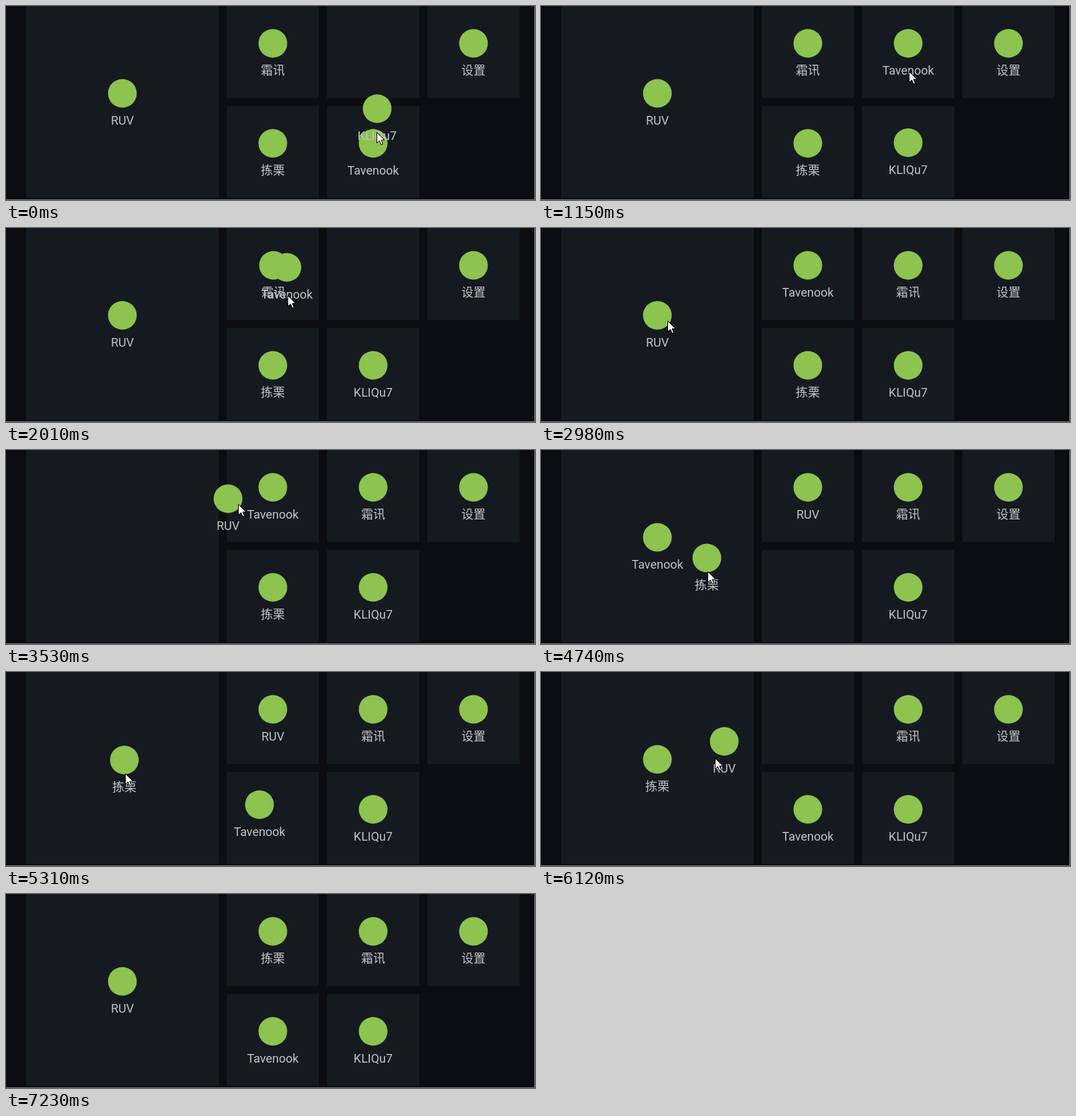
Animation of 791 by 291 pixels, one loop 7.79 s. Source, as an HTML page with a canvas:

```html
<!DOCTYPE html>
<html lang="zh-CN">
<head>
<meta charset="utf-8">
<title>Tile launcher</title>
<style>
html, body { margin: 0; width: 100%; height: 100%; overflow: hidden; background: #0c0d10; }
canvas { display: block; }
</style>
</head>
<body>
<canvas id="stage" width="791" height="291"></canvas>
<script>
const ctx = document.getElementById('stage').getContext('2d');
const LOOP = 7790, STEP = 138.6;
const SLIDE = 420, SETTLE = 300, TRAVEL = 250, BOW = 6.5;
const POINTER_GONE = 7200, EXIT = [200, 220];

// Icon centres: one large slot, five small ones
const slot = (col, row) => [399 + 150 * col, 56 + 150 * row];
const A = [174, 131], B = slot(0, 0), C = slot(1, 0), D = slot(2, 0), E = slot(0, 1), F = slot(1, 1);

const homes = { RUV: A, '霜讯': B, KLIQu7: C, '设置': D, '拣栗': E, Tavenook: F };

// swap: when the item in the way starts to slide; grab: pointer relative to icon;
// reach: share of the way covered when the item is let go
const drags = [
  { label: 'KLIQu7', from: C, to: F, start: -646, swap: 300, drop: 900, grab: [-1, 35], reach: 0.95 },
  { label: 'Tavenook', from: C, to: B, start: 1330, swap: 1960, drop: 2290, grab: [1, 42], reach: 0.96 },
  { label: 'RUV', from: A, to: B, start: 3130, swap: 3720, drop: 3900, grab: [15, 8], reach: 0.97 },
  { label: '拣栗', from: E, to: A, start: 4270, swap: 4960, drop: 5400, grab: [1, 20], reach: 0.995 },
  { label: 'RUV', from: B, to: A, start: 5800, swap: 6700, drop: 6700, grab: [-14, 25], reach: 0.935 }
];

const add = (p, q) => [p[0] + q[0], p[1] + q[1]];
const mix = (p, q, u) => [p[0] + (q[0] - p[0]) * u, p[1] + (q[1] - p[1]) * u];
const clamp = u => Math.max(0, Math.min(1, u));
const smooth = u => { u = clamp(u); return u * u * (3 - 2 * u); };

// Slows down along a slightly bowed path, then settles in the slot
function heldAt({ from, to, start, drop, reach }, t) {
  const u = clamp((t - start) / (drop - start));
  const s = reach * (1 - (1 - u) ** 2);
  const dx = to[0] - from[0], dy = to[1] - from[1];
  const bow = BOW * Math.sin(Math.PI * s) / Math.hypot(dx, dy);
  const pos = add(mix(from, to, s), [dy * bow, -dx * bow]);
  return mix(pos, to, smooth((t - drop) / SETTLE));
}

function pointerAt(t) {
  const i = drags.filter(d => d.start <= t).length - 1;
  const drag = drags[i], next = drags[i + 1];
  const held = add(heldAt(drag, Math.min(t, drag.drop)), drag.grab);
  const goal = next ? add(next.from, next.grab) : EXIT;
  return mix(held, goal, smooth((t - drag.drop) / TRAVEL));
}

// Positions of all items, the one moved last on top
function layout(t) {
  const home = { ...homes }, pos = { ...homes };
  for (const drag of drags.filter(d => d.start <= t)) {
    const { label, from, to, swap } = drag;
    const other = Object.keys(home).find(k => home[k] === to && k !== label);
    home[other] = from;
    home[label] = to;
    pos[other] = mix(to, from, smooth((t - swap) / SLIDE));
    delete pos[label];
    pos[label] = heldAt(drag, t);
  }
  // The first item starts out at the slot its drag begins from
  return Object.entries(pos);
}

function drawItem([label, pos]) {
  const [x, y] = pos.map(Math.round);
  ctx.fillStyle = '#8dc34f';
  ctx.beginPath();
  ctx.arc(x, y, 21.5, 0, 7);
  ctx.fill();
  ctx.fillStyle = '#c3c4c5';
  ctx.fillText(label, x, y + 47);
}

function drawPointer(pos) {
  const [x, y] = pos.map(Math.round);
  const arrow = [[0, 0], [0, 16], [4, 12.5], [6.5, 18.5], [9, 17.5], [6.5, 11.5], [11.5, 11.5]];
  ctx.beginPath();
  arrow.forEach(([dx, dy]) => ctx.lineTo(x + dx + 0.5, y + dy + 0.5));
  ctx.closePath();
  ctx.fillStyle = '#fff';
  ctx.fill();
  ctx.strokeStyle = '#000';
  ctx.stroke();
}

function draw() {
  // The screen refreshes in even steps
  const step = Math.max(0, Math.floor((performance.now() % LOOP - 20) / STEP));
  const t = 36 + step * STEP;

  ctx.fillStyle = '#0c0d10';
  ctx.fillRect(0, 0, 791, 291);
  ctx.fillStyle = '#151a20';
  ctx.fillRect(30, 0, 288, 288);
  for (const [x, y] of [B, C, D, E, F]) ctx.fillRect(x - 69, y - 56, 138, 138);
  ctx.fillStyle = '#7a7a7a';
  ctx.fillRect(790, 0, 1, 291);
  ctx.fillRect(0, 290, 791, 1);

  ctx.font = '18px Roboto, "Noto Sans CJK SC", sans-serif';
  ctx.textAlign = 'center';
  layout(t).forEach(drawItem);
  if (t < POINTER_GONE) drawPointer(pointerAt(t));
  requestAnimationFrame(draw);
}
draw();
</script>
</body>
</html>
```
